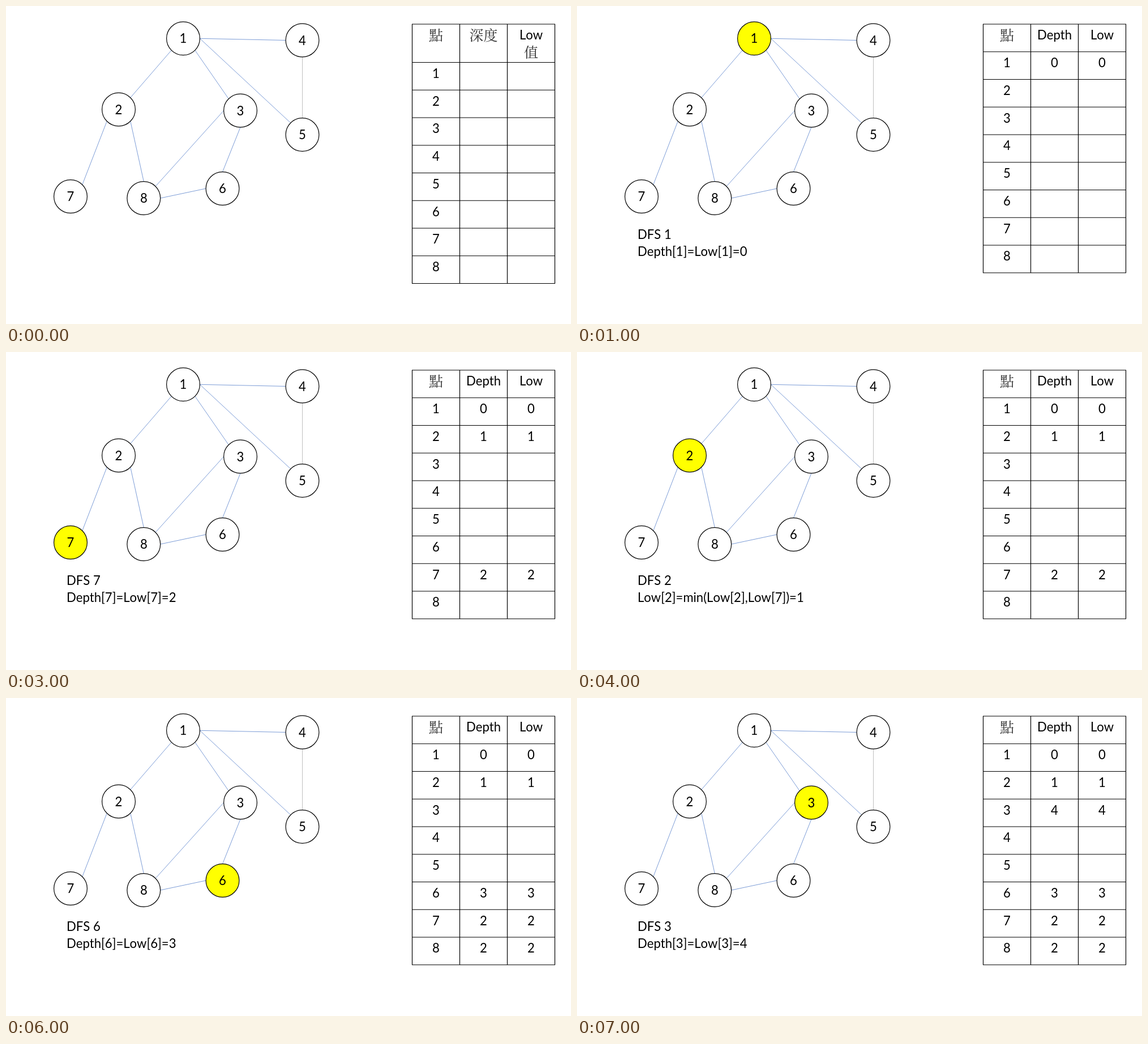
An HTML page for the animation above (8000 ms loop, 998 by 561 pixels).

```html
<!DOCTYPE html>
<html lang="zh-Hant">
<meta charset="utf-8">
<title>Depth-first search: depth and low values</title>
<style>
  html, body { margin: 0; width: 100%; height: 100%; overflow: hidden; background: #fff; }
  svg { display: block; width: 100%; height: 100%; }
  text { font: 22.1px Lato, "Noto Sans CJK TC", sans-serif; font-kerning: none; white-space: pre; }
  .mid { text-anchor: middle; }
  .cjk { font: 100 25px "Noto Serif CJK TC", "Noto Sans CJK TC", "Noto Sans CJK", serif; fill: #333; }
  .edge { stroke: #4472c4; stroke-width: .7; }
  .gray { stroke: #a5a5a5; }
  circle, .grid { stroke: #000; stroke-width: 1.2; }
</style>
<svg id="stage" viewBox="0 0 998 561"></svg>
<script>
const stage = document.getElementById('stage');
const STEP = 1000, RADIUS = 29.4;
const TABLE = { x: 717.5, y: 32, column: 84, row: 48.75, tallRow: 67.5 };
const nodes = [[313, 57.3], [199, 182.5], [414, 184.5], [523.5, 60.5],
               [523.5, 227], [382.5, 322], [114, 336], [243.3, 339]];

// Edges join compass points on the rims of two nodes.
const compass = ['E', 'SE', 'S', 'SW', 'W', 'NW', 'N', 'NE'];
const edges = ['1SW 2NE', '1SE 3NW', '1E 4W', '1E 5NW', '4S 5N',
               '2SW 7NE', '2SE 8N', '3W 8NE', '3S 6N', '8E 6W'];

// Each step visits a node; a step without depth only updates its low value.
const steps = [
  {}, { node: 1, depth: 0 }, { node: 2, depth: 1 }, { node: 7, depth: 2 },
  { node: 2, note: 'Low[2]=min(Low[2],Low[7])=1' },
  { node: 8, depth: 2 }, { node: 6, depth: 3 }, { node: 3, depth: 4 }
];

const text = (x, y, s, cls = 'mid') => `<text x="${x}" y="${y}" class="${cls}">${s}</text>`;
const line = (x1, y1, x2, y2, cls) =>
  `<line x1="${x1}" y1="${y1}" x2="${x2}" y2="${y2}" class="${cls}"/>`;
const cell = (col, y, s, cls) => text(TABLE.x + (col + .5) * TABLE.column, y, s, cls);

function rimPoint(spec) {
  const [x, y] = nodes[spec[0] - 1];
  const angle = compass.indexOf(spec.slice(1)) * Math.PI / 4;
  return [x + RADIUS * Math.cos(angle), y + RADIUS * Math.sin(angle)];
}

function graph(active) {
  const lines = edges.map(edge =>
    line(...edge.split(' ').flatMap(rimPoint), edge === '4S 5N' ? 'edge gray' : 'edge'));
  const circles = nodes.map(([x, y], i) =>
    `<circle cx="${x}" cy="${y}" r="${RADIUS}" fill="${i + 1 === active ? '#ff0' : '#fff'}"/>` +
    text(x, y + 8, i + 1));
  return lines.concat(circles).join('');
}

function table(index) {
  const intro = index === 0;
  const { x, y, column, row } = TABLE;
  const headHeight = intro ? TABLE.tallRow : row;
  const rowTop = r => r ? y + headHeight + (r - 1) * row : y;
  const baseline = r => rowTop(r) + 27.4;
  let out = cell(0, 60.5, '點', 'mid cjk') + cell(2, baseline(0), 'Low');
  out += intro
    ? cell(1, 60.5, '深度', 'mid cjk') + cell(2, 91, '值', 'mid cjk')
    : cell(1, baseline(0), 'Depth');
  for (let r = 0; r <= 9; r++) out += line(x - .5, rowTop(r), x + 3 * column + .5, rowTop(r), 'grid');
  for (let c = 0; c <= 3; c++) out += line(x + c * column, y, x + c * column, rowTop(9), 'grid');
  for (let r = 1; r <= 8; r++) out += cell(0, baseline(r), r);
  for (const { node, depth } of steps.slice(0, index + 1)) {
    if (depth === undefined) continue;
    out += cell(1, baseline(node), depth) + cell(2, baseline(node), depth);
  }
  return out;
}

function caption({ node, depth, note }) {
  if (!node) return '';
  return text(107, 411, `DFS ${node}`, '') +
    text(107, 441, note || `Depth[${node}]=Low[${node}]=${depth}`, '');
}

let shown = -1;
function frame() {
  const index = Math.floor(performance.now() / STEP) % steps.length;
  if (index !== shown) {
    shown = index;
    stage.innerHTML = graph(steps[index].node) + table(index) + caption(steps[index]);
  }
  requestAnimationFrame(frame);
}
frame();
</script>
</html>
```
